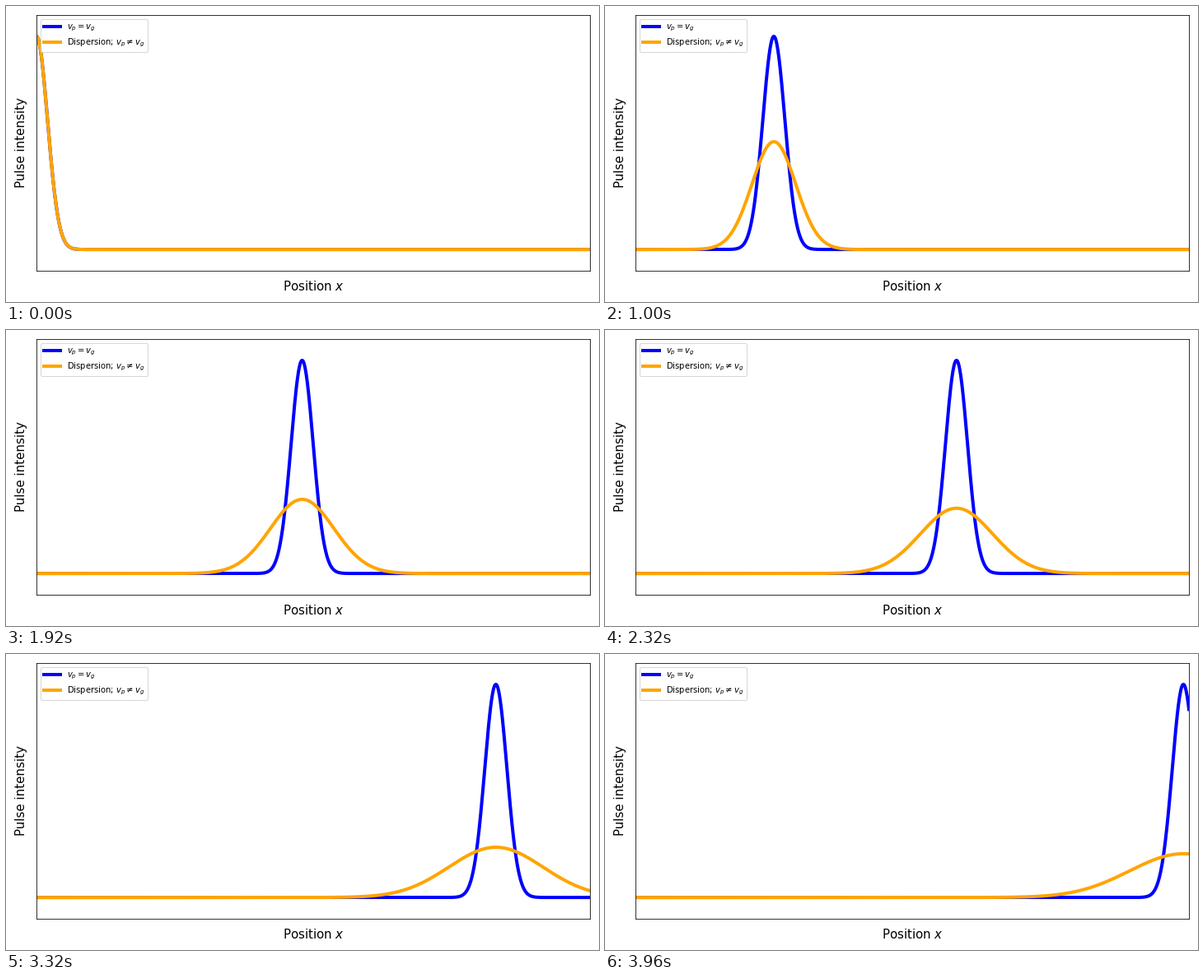
Write a matplotlib script that moves like this. It is 720 px wide and 360 px high and loops after 4000 ms.

```python
import numpy as np
import matplotlib.pyplot as plt
from matplotlib.animation import FuncAnimation

W, H, DPI = 720, 360, 72
FRAMES, INTERVAL = 100, 40
LEFT, RIGHT, TOP, BOTTOM = 37, 709, 11, 322
MARGIN = 10.8

SIGMA = 0.02    # pulse width as a share of the axis
SPREAD = 3.91   # relative broadening over one loop

plt.rcParams["font.family"] = "DejaVu Sans"

x = np.linspace(0, 1, 1000)


def pulse(center, stretch=1.0):
    """Gaussian whose area stays constant as it is stretched."""
    return np.exp(-0.5 * ((x - center) / (SIGMA * stretch)) ** 2) / stretch


fig = plt.figure(figsize=(W / DPI, H / DPI), dpi=DPI, facecolor="white")
ax = fig.add_axes([LEFT / W, 1 - BOTTOM / H, (RIGHT - LEFT) / W, (BOTTOM - TOP) / H])
ax.set(xlim=(0, 1), ylim=(-0.1, 1.1), xticks=[], yticks=[])

steady, = ax.plot(x, pulse(0), color="blue", lw=4, label=r"$v_p = v_g$")
spread, = ax.plot(x, pulse(0), color="orange", lw=4,
                  label=r"Dispersion; $v_p \neq v_g$")
ax.legend(loc="upper left", fontsize=10)

fig.text((LEFT + RIGHT) / 2 / W, MARGIN / H, "Position $x$",
         fontsize=15, ha="center", va="bottom")
fig.text(MARGIN / W, 1 - (TOP + BOTTOM) / 2 / H, "Pulse intensity",
         fontsize=15, rotation=90, ha="left", va="center")


def update(i):
    t = i / FRAMES
    steady.set_ydata(pulse(t))
    spread.set_ydata(pulse(t, 1 + SPREAD * t))
    return steady, spread


anim = FuncAnimation(fig, update, frames=FRAMES, interval=INTERVAL,
                     repeat=True, repeat_delay=0)
plt.show()
```
